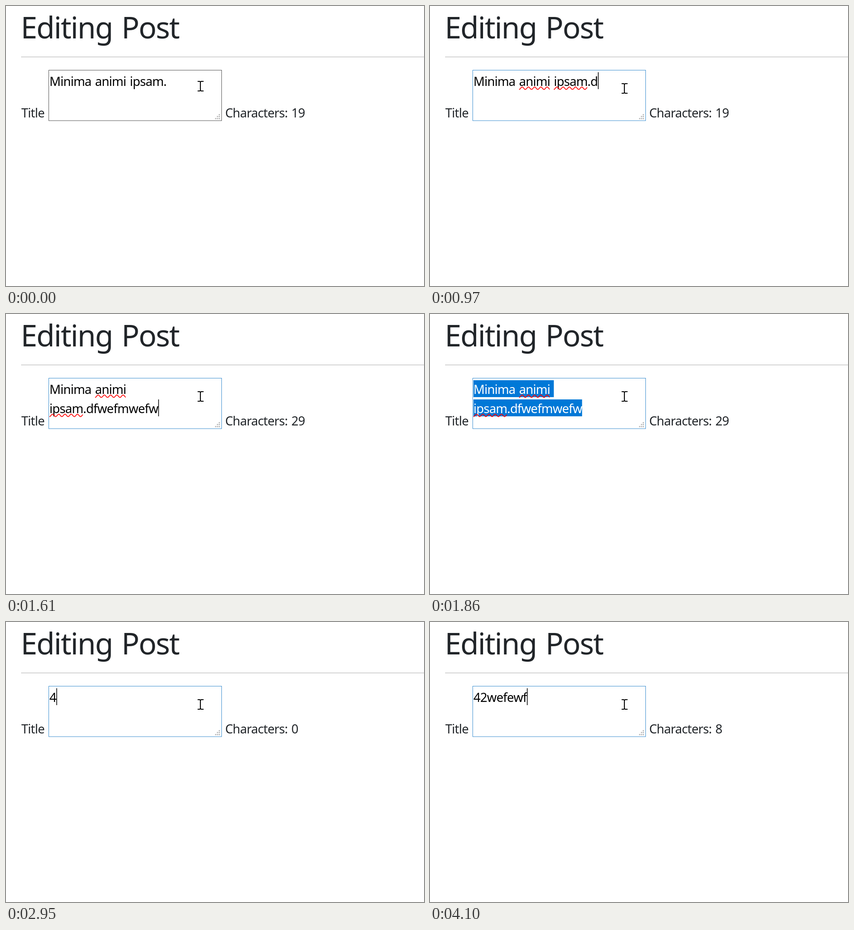
These frames come from a looping animation (914 px wide and 613 px high, 4.35 s). An HTML page:

```html
<!DOCTYPE html>
<html lang="en">
<head>
<meta charset="utf-8">
<title>Editing Post</title>
<style>
  html, body { margin: 0; width: 100%; height: 100%; overflow: hidden; background: #fff; }
  svg { display: block; }
  text {
    font: 27.2px "Noto Sans", "Open Sans", sans-serif;
    letter-spacing: -.028em; word-spacing: .07em;
    fill: #212529; white-space: pre;
  }
  .heading { font-size: 65px; }
  .field text { fill: #000; }
  .field.selected text { fill: #fff; }
  .wave { fill: none; stroke: #f00; stroke-width: 1.7; }
</style>
</head>
<body>
<svg width="914" height="613" viewBox="0 0 914 613">
  <text class="heading" x="32.3" y="71">Editing Post</text>
  <path d="M33 111.5H914" stroke="#c4c4c4" stroke-width="1.5"/>
  <text x="33.5" y="244">Title</text>
  <text id="counter" x="479.2" y="244"></text>
  <rect id="box" x="93.5" y="140.5" width="378" height="110.5" fill="#fff"/>
  <path d="M465 238h3M461 242h3m1 0h3M457 246.5h3m1 0h3m1 0h3" stroke="#bbb" stroke-width="2.6"/>
  <g id="field" class="field">
    <rect id="mark1" x="95" y="145" height="37" fill="#0078d7"/>
    <rect id="mark2" x="95" y="187" height="37" fill="#0078d7"/>
    <text id="line1" x="95" y="175"></text>
    <text id="line2" x="95" y="217"></text>
    <path id="wave1" class="wave"/>
    <path id="wave2" class="wave"/>
  </g>
  <rect id="caret" width="1.5" height="37"/>
  <path id="pointer" d="M-6-10.5h4.5L0-9.5 2-10.5h5M-6 10.5h4.5L0 9.5 2 10.5h5M0-10V10" fill="none" stroke="#000" stroke-width="2"/>
  <circle id="click" cx="423" cy="180" r="16" fill="#ff0" opacity=".5"/>
</svg>
<script>
const $ = id => document.getElementById(id);
const LOOP = 4350, LEFT = 95;
const FIRST = 'Minima animi ', SECOND = 'ipsam.', START = FIRST + SECOND;

// [time, text, counter]
const typing = [
  [0, START, 19],
  [970, START + 'd', 19],
  [1050, START + 'df', 20],
  [1130, START + 'dfw', 21],
  [1210, START + 'dfwe', 22],
  [1290, START + 'dfwefm', 24],
  [1370, START + 'dfwefmwe', 26],
  [1450, START + 'dfwefmwef', 27],
  [1530, START + 'dfwefmwefw', 28],
  [1610, START + 'dfwefmwefw', 29],
  [2190, '', 29],
  [2270, '', 0],
  [2950, '4', 0],
  [3030, '42', 1],
  [3110, '42', 2],
  [3280, '42we', 2],
  [3450, '42wef', 4],
  [3530, '42wefe', 5],
  [3610, '42wefewf', 7],
  [3690, '42wefewf', 8]
];
const pointerY = [[0, 175.5], [80, 177.5], [150, 179.5], [220, 180.5]];

const latest = (steps, t) => steps.filter(s => s[0] <= t).pop();
const within = (t, from, to) => t >= from && t < to;
const show = (id, on) => $(id).setAttribute('visibility', on ? 'visible' : 'hidden');
const set = (id, attrs) => {
  for (const name in attrs) $(id).setAttribute(name, attrs[name]);
};
const widthOf = (id, from, to) =>
  to > from ? $(id).getSubStringLength(from, to - from) : 0;

function wave(x, width, baseline) {
  let d = '';
  for (let i = 0; i <= width; i++) {
    const y = baseline + 5 + 2.7 * Math.cos(i * 2 * Math.PI / 13.6);
    d += (i ? 'L' : 'M') + (x + i).toFixed(1) + ' ' + y.toFixed(2);
  }
  return d;
}

function draw(t) {
  const [, text, count] = latest(typing, t);
  const wrapped = text.length > START.length + 6;
  const focused = t >= 480;
  const selected = within(t, 1860, 2190);
  const spelled = focused && text.startsWith(FIRST);

  $('line1').textContent = wrapped ? FIRST : text;
  $('line2').textContent = wrapped ? text.slice(FIRST.length) : '';
  $('counter').textContent = 'Characters: ' + count;
  set('box', { stroke: focused ? '#3c8fd0' : '#555' });

  show('wave1', spelled);
  show('wave2', spelled);
  if (spelled) {
    set('wave1', { d: wave(LEFT + widthOf('line1', 0, 7), widthOf('line1', 7, 12), 175) });
    set('wave2', { d: wrapped
      ? wave(LEFT, widthOf('line2', 0, 5), 217)
      : wave(LEFT + widthOf('line1', 0, 13), widthOf('line1', 13, 18), 175) });
  }

  const last = wrapped ? 'line2' : 'line1';
  const end = widthOf(last, 0, $(last).textContent.length);
  set('caret', { x: LEFT + end + .3, y: wrapped ? 187 : 145 });
  show('caret', focused && !selected && !within(t, 2520, 2950) && !within(t, 3690, 4100));

  $('field').classList.toggle('selected', selected);
  show('mark1', selected);
  show('mark2', selected);
  if (selected) {
    set('mark1', { width: widthOf('line1', 0, FIRST.length) });
    set('mark2', { width: end });
  }

  set('pointer', { transform: `translate(425 ${latest(pointerY, t)[1]})` });
  show('click', within(t, 390, 560));
}

const begin = performance.now();
function tick() {
  draw((performance.now() - begin) % LOOP);
  requestAnimationFrame(tick);
}
tick();
</script>
</body>
</html>
```
